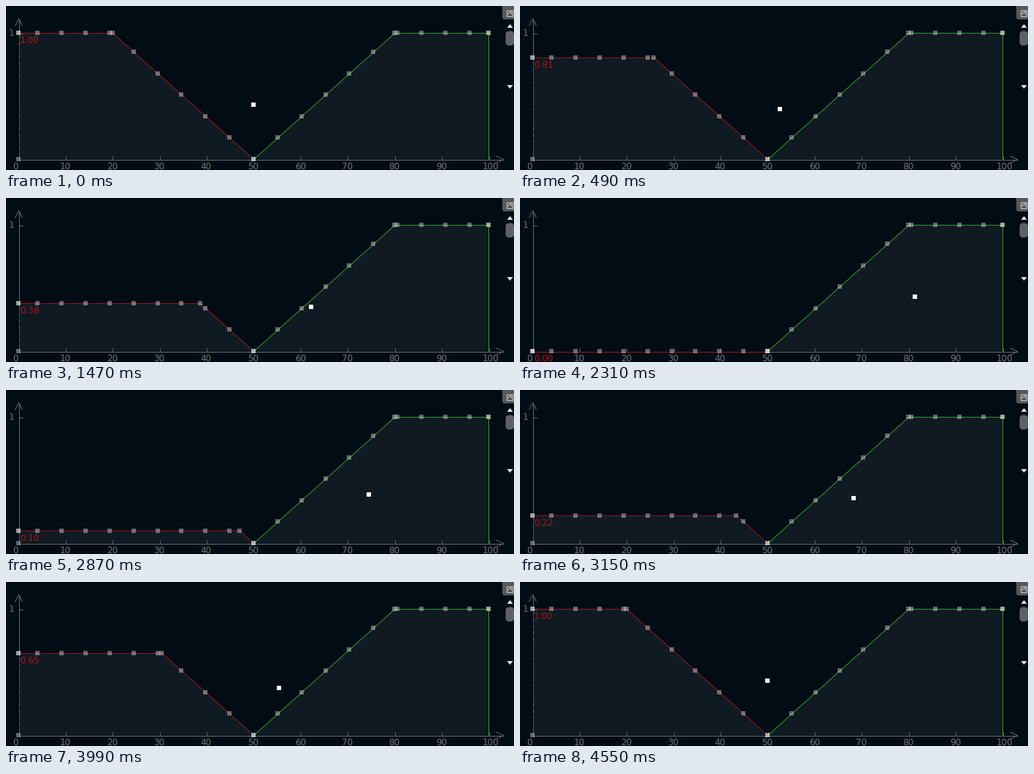
Write a matplotlib script that moves like this. It is 696x226 px and loops after 4830 ms.

```python
import matplotlib.pyplot as plt
import numpy as np
from matplotlib.animation import FuncAnimation
from matplotlib.collections import PolyCollection
from matplotlib.patches import FancyBboxPatch, Polygon

W, H, DPI = 696, 226, 64  # power-of-two dpi keeps the pixel size exact
FRAMES, STEP_MS = 69, 70
PX = 72 / DPI

BG, AXIS, LABEL = "#020c15", "#63686d", "#6f7478"
RED, GREEN, VALUE = "#8f1c1f", "#359a2c", "#b01414"

# Height of the left plateau over time, in animation steps
KEY_STEPS = [0, 1, 12, 13, 14, 21, 25, 38, 41, 49, 57, 65, 68]
KEY_LEVELS = [1, 1, .645, .645, .61, .38, 0, 0, .10, .34, .65, 1, 1]

LEFT_SAMPLES = 50 - 5.1 * np.arange(1, 10)
RIGHT_SAMPLES = 50 + 5.1 * np.arange(1, 10)


def sx(x):
    return 17 + 6.44 * x


def sy(y):
    return 211 - 174 * y


def to_px(points):
    return [(sx(x), sy(y)) for x, y in points]


def squares(points, size=6):
    """Pixel-aligned squares centred on screen points."""
    out = []
    for x, y in points:
        left, top = np.round(x) - size / 2 - .5, np.round(y) - size / 2 - .5
        out.append([(left, top), (left + size, top),
                    (left + size, top + size), (left, top + size)])
    return out


def left_height(x, level):
    return min(level, (50 - x) / 30)


def centroid(level):
    """Area centroid of the clipped left set and the full right set."""
    knee = 50 - 30 * level
    parts = [
        (knee * level, knee / 2, level / 2),
        ((50 - knee) * level / 2, knee + (50 - knee) / 3, level / 3),
        (15, 70, 1 / 3),
        (20, 90, 1 / 2),
    ]
    area = sum(a for a, _, _ in parts)
    return (sum(a * x for a, x, _ in parts) / area,
            sum(a * y for a, _, y in parts) / area)


fig = plt.figure(figsize=(W / DPI, H / DPI), dpi=DPI, facecolor=BG)
ax = fig.add_axes([0, 0, 1, 1])
ax.set_xlim(-.5, W - .5)
ax.set_ylim(H - .5, -.5)
ax.axis("off")


def line(points, color, z=2, width=1, **kw):
    xs, ys = zip(*points)
    return ax.plot(xs, ys, color=color, lw=width * PX, zorder=z,
                   solid_capstyle="butt", **kw)[0]


def label(x, y, text, color=LABEL, **kw):
    return ax.text(x, y, text, color=color, fontsize=12 * PX,
                   family="DejaVu Sans", va="center", **kw)


def draw_axes():
    line([(17, 211), (681, 211)], AXIS)
    line([(671, 206), (681, 211), (671, 216)], AXIS)
    line([(17, 211), (17, 17)], AXIS)
    line([(12, 27), (17, 17), (22, 27)], AXIS)
    line([(17, 37), (22, 37)], AXIS)
    label(6.5, 37, "1", ha="center")
    label(12.5, 221, "0", ha="center")
    for v in range(10, 101, 10):
        line([(sx(v), 206), (sx(v), 211)], AXIS)
        label(sx(v) + (2 if v == 100 else -.7), 221, str(v), ha="center")


def draw_side_panel():
    def pill(x, y, w, h, r, color):
        ax.add_patch(FancyBboxPatch(
            (x, y), w, h, boxstyle=f"round,pad=0,rounding_size={r}",
            fc=color, ec="none", zorder=6))

    pill(679.5, -4, 22, 22, 3, "#57595b")
    pill(684, 34, 11.5, 20, 5, "#5f6265")
    icon = "#c9cbcc"
    line([(685, 5), (693, 5), (693, 13), (685, 13), (685, 5)], icon, 7)
    line([(687, 11), (691, 7)], icon, 7)
    line([(688, 7), (691, 7), (691, 10)], icon, 7)
    for y, d in ((27, 1), (111, -1)):
        ax.add_patch(Polygon([(686, y + 2.5 * d), (694, y + 2.5 * d), (690, y - 2.5 * d)],
                             fc="#e4e6e7", ec="none", zorder=6))


draw_axes()
draw_side_panel()

area = Polygon([(0, 0)], fc="white", alpha=.06, ec="none", zorder=1)
ax.add_patch(area)
line(to_px([(50, 0), (80, 1), (100, 1), (100, 0)]), GREEN, 3)
red_line = line([(0, 0)], RED, 3)
red_edge = line([(0, 0)], RED, 3, dashes=(6, 3))
value = label(18.5, 0, "", VALUE, zorder=4)

handles = PolyCollection([], facecolors="#ffffff", alpha=.38, linewidths=0,
                         antialiaseds=False, zorder=5)
center = PolyCollection([], facecolors="white", linewidths=0,
                        antialiaseds=False, zorder=8)
ax.add_collection(handles, autolim=False)
ax.add_collection(center, autolim=False)


def update(i):
    level = float(np.interp(i, KEY_STEPS, KEY_LEVELS))
    knee = 50 - 30 * level
    left = [(0, level), (knee, level), (50, 0)]
    right = [(50, 0), (80, 1), (100, 1)]

    area.set_xy(to_px([(0, 0)] + left + right + [(100, 0)]))
    red_line.set_data(*zip(*to_px(left)))
    red_edge.set_data(*zip(*to_px([(0, 0), (0, level)])))

    # Corners shared by two segments carry two overlapping handles
    marks = [(0, 0), (0, level)] + left + right + [(100, 1)]
    marks += [(x, left_height(x, level)) for x in LEFT_SAMPLES]
    marks += [(x, min(1, (x - 50) / 30)) for x in RIGHT_SAMPLES]
    handles.set_verts(squares(to_px(marks)))
    center.set_verts(squares(to_px([centroid(level)])))

    value.set_text(f"{level:.2f}")
    value.set_y(sy(level) + 10)
    return area, red_line, red_edge, handles, center, value


anim = FuncAnimation(fig, update, frames=FRAMES, interval=STEP_MS,
                     repeat=True, repeat_delay=0, blit=False)
plt.show()
```
